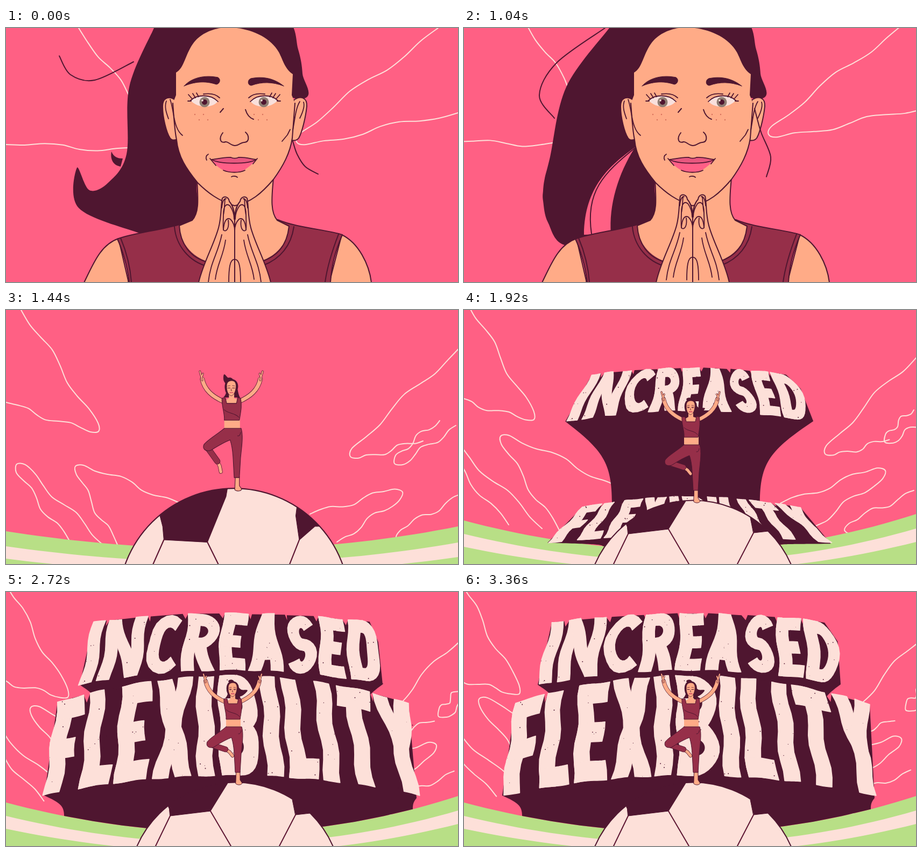
Write an HTML page with a canvas that moves like this. It is 840 by 473 pixels and loops after 3440 ms.

```html
<!DOCTYPE html>
<html lang="en">
<head>
<meta charset="utf-8">
<title>Increased flexibility</title>
<style>
html, body { margin: 0; width: 100%; height: 100%; overflow: hidden; background: #ff6084; }
canvas { display: block; width: 840px; height: 473px; }
</style>
</head>
<body>
<canvas id="stage" width="840" height="473" role="img" aria-label="Increased flexibility"></canvas>
<script>
const ctx = document.getElementById('stage').getContext('2d');
const LOOP = 3440, STEP = 80;
const PINK = '#ff6084', DARK = '#4f1630', SKIN = '#ffab87', WINE = '#962f49', CREAM = '#fde0d9', GREEN = '#b8df86';

const mix = (a, b, u) => a + (b - a) * u;
const mixAll = (a, b, u) => a.map((v, i) => mix(v, b[i], u));
const clamp = u => Math.max(0, Math.min(1, u));
const span = (t, from, to) => clamp((t - from) / (to - from));
const easeOut = u => 1 - (1 - u) ** 3;

function paint(d, fill, line, width = 2) {
  const p = typeof d === 'string' ? new Path2D(d) : d;
  if (fill) { ctx.fillStyle = fill; ctx.fill(p); }
  if (line) { ctx.strokeStyle = line; ctx.lineWidth = width; ctx.stroke(p); }
}

function poly(points) {
  const path = new Path2D();
  for (const p of points) path.lineTo(...p);
  path.closePath();
  return path;
}

// smooth curve through flat x, y points
function curve(p) {
  const path = new Path2D(), n = p.length / 2;
  const q = i => { i = Math.max(0, Math.min(n - 1, i)); return [p[2 * i], p[2 * i + 1]]; };
  path.moveTo(p[0], p[1]);
  for (let i = 0; i < n - 1; i++) {
    const [a, b, c, d] = [q(i - 1), q(i), q(i + 1), q(i + 2)];
    path.bezierCurveTo(b[0] + (c[0] - a[0]) / 6, b[1] + (c[1] - a[1]) / 6,
      c[0] - (d[0] - b[0]) / 6, c[1] - (d[1] - b[1]) / 6, c[0], c[1]);
  }
  return path;
}

function dot(x, y, r, color) {
  ctx.fillStyle = color;
  ctx.beginPath();
  ctx.arc(x, y, r, 0, 7);
  ctx.fill();
}

function mirrored(axis, draw) {
  draw();
  ctx.save();
  ctx.translate(2 * axis, 0);
  ctx.scale(-1, 1);
  draw();
  ctx.restore();
}

// ---------- drifting cloud lobes ----------
// wide and close: start, tip, end; push and nudge: how the tip travels
const lobes = [
  { wide: [28, 0, 172, 226, 0, 172], push: [-42, -22], close: [135, 0, 292, 222, 0, 217], nudge: [-36, -10] },
  { wide: [845, 68, 640, 273, 775, 244], push: [31, -5], close: [803, 0, 540, 212, 840, 158], nudge: [26, -14] },
  { wide: [180, 437, 20, 287, 118, 430], push: [-70, -60] },
  { wide: [207, 437, 129, 291, 320, 358], push: [-61, -56] },
  { wide: [836, 215, 722, 286, 806, 206], push: [60, -40] },
  { wide: [565, 380, 737, 339, 615, 432], push: [46, -40] },
  { wide: [800, 452, 725, 424, 845, 343], push: [-18, -14] }
];
const travel = (p, [dx, dy], k) => p.map((v, i) => v + (i % 2 ? dy : dx) * k * (i === 2 || i === 3 ? 1 : .5));

function lobeCurve([x0, y0, tx, ty, x1, y1], phase) {
  const mx = tx - (x0 + x1) / 2, my = ty - (y0 + y1) / 2, len = Math.hypot(mx, my);
  const dx = mx / len, dy = my / len, r = 11;
  const sign = Math.sign((y0 - ty) * dx - (x0 - tx) * dy);
  const side = (x, y, s, ph) => {
    const pts = [];
    for (let i = 0; i <= 8; i++) {
      const u = i / 8, wave = 7 * Math.sin(Math.PI * u) * Math.sin(u * 10 + ph);
      pts.push([mix(x, tx - dx * r - dy * r * s, u) - dy * wave, mix(y, ty - dy * r + dx * r * s, u) + dx * wave]);
    }
    return pts;
  };
  return curve([...side(x0, y0, sign, phase), [tx, ty], ...side(x1, y1, -sign, phase + 2).reverse()].flat());
}

function drawLobes(t, zoom) {
  const far = easeOut(span(t, 1440, 1920)) + .65 * span(t, 1920, 3360);
  lobes.forEach((l, i) => {
    let p = travel(l.wide, l.push, far);
    if (l.close) p = mixAll(travel(l.close, l.nudge, span(t, 0, 1040)), p, span(t, 1040, 1440));
    else if (t < 1280) return;
    else p = p.map((v, j) => j % 2 ? 147 + (v - 147) * zoom : 423 + (v - 423) * zoom);
    paint(lobeCurve(p, i * 1.7 + t / 1400), null, CREAM, 2);
  });
}

// ---------- portrait ----------
function drawEye() {
  paint('M343 135C354 124 380 122 394 136C385 149 358 151 343 135Z', '#f9e0dc');
  dot(369, 138, 9.5, '#8f7d72');
  paint('M343 135C354 124 380 122 394 137M367 123C380 121 391 124 397 130', null, DARK, 1.8);
  paint('M339 124L346 132M347 122L352 130M354 121L358 128M338 136L344 136', null, DARK, 1.8);
}

function drawHand() {
  paint('M357 478C365 440 386 405 395 372C401 350 399 330 402 317C406 312 414 315 415 323C423 332 425 344 425 360V478Z', SKIN, DARK);
  paint('M407 318C406 330 406 340 404 348C404 356 403 366 404 376M401 335C402 322 405 318 409 318M404 348C404 330 410 326 416 331C421 338 424 346 424 356', null, DARK, 1.8);
  paint('M404 376C405 360 410 352 417 356C423 362 425 368 425 378M405 377C411 380 415 370 413 358', null, DARK, 1.8);
  paint('M401 385C394 420 380 435 376 473M408 395C404 425 392 440 389 468M414 473C414 448 416 430 425 431', null, DARK, 1.8);
}

function drawHair(u) {
  const edge = mixAll(
    [275, 0, 229, 110, 224, 235, 190, 288, 155, 302, 132, 260, 135, 335, 245, 381],
    [270, 0, 190, 110, 160, 240, 150, 280, 147, 303, 147, 322, 156, 362, 190, 405], u);
  paint(curve([...edge, 300, 395, 358, 350, 355, 285, 380, 100, 549, 132, 551, 85, 543, 40, 520, -20, 410, -75, 300, -35, 275, 0]), DARK);
  paint(curve(mixAll([99, 52, 120, 87, 165, 97, 237, 63], [168, 168, 140, 125, 172, 65, 262, 0], u)), null, DARK);
  if (u < .6) paint('M196 230C200 240 207 243 217 243L213 258C200 256 193 245 196 230Z', DARK);
  const gap = span(u, .4, 1);
  if (!gap) return;
  ctx.save();
  ctx.translate(318, 0);
  ctx.scale(mix(.7, 1, gap), 1);
  paint('M0 222C-46 255 -94 295 -95 385L-45 383C-49 330 -32 272 0 222Z', PINK);
  paint('M-1 224C-58 270 -93 305 -81 383', null, DARK);
  ctx.restore();
}

function drawPortrait(t) {
  const u = span(t, 0, 1040);
  drawHair(u);

  // arms, neck, top
  paint('M209 392C175 404 162 440 145 474L90 800H260L227 470Z', SKIN, DARK);
  paint('M624 385C655 400 675 440 679 474L720 800H580L602 470Z', SKIN, DARK);
  paint('M207 393C230 383 290 376 322 366L345 358L505 357C540 372 600 376 625 385C610 420 605 445 603 473L620 850H210L229 473C225 440 215 410 207 393Z', WINE, DARK);
  paint('M355 280C357 320 359 344 346 358L322 368C324 400 345 432 395 440H455C500 430 522 405 526 369L504 358C492 344 493 320 497 275Z', SKIN);
  paint('M355 283C357 320 359 344 346 358L322 368C324 400 340 428 378 437M472 436C505 425 522 405 526 369L504 358C492 344 493 320 497 280', null, DARK);
  paint('M313 370C316 405 340 435 375 444M535 370C530 405 510 430 478 442M213 391C223 415 231 445 233 473M618 384C606 415 597 445 593 473', null, DARK);

  // ears and face
  paint('M314 134C304 126 291 129 291 146C291 166 298 195 305 205C309 210 314 209 318 207Z', SKIN, DARK);
  paint('M535 134C548 125 560 130 559 146C557 166 550 195 544 205C540 210 535 210 531 209Z', SKIN, DARK);
  paint('M316 83C331 75 333 50 347 30C362 8 390 -1 412 -1C450 -1 490 15 507 45C515 60 518 76 533 86L531 125L537 140L532 205C528 233 515 257 497 282C475 308 455 325 425 331C400 328 375 305 356 288C335 262 320 240 317 208L309 143L316 125Z', SKIN);
  paint('M310 140C312 165 313 190 317 208C320 240 335 262 356 288C375 307 395 322 425 331C455 325 475 308 497 282C515 257 528 233 532 205L537 140', null, DARK);
  paint('M298 136C294 147 298 158 302 169M305 133C311 150 311 170 317 184C320 192 324 197 328 200M553 138C556 147 550 160 546 168M546 137C538 150 537 170 533 190M513 211L523 199L528 189', null, DARK, 1.8);
  paint(curve(mixAll([533, 211, 541, 235, 556, 258, 580, 272], [540, 150, 552, 194, 570, 240, 562, 277], u)), null, DARK);

  // features
  mirrored(424, drawEye);
  for (const x of [369, 479]) {
    dot(x, 138, 5, DARK);
    dot(x - 4, 135, 1.8, CREAM);
    for (let i = 0; i < 4; i++) dot(x - 18 + i * 8, 163 + (i % 2 ? 8 : -2), 1.2, '#d8705c');
  }
  paint('M331 108C345 92 370 87 394 92C400 96 397 104 391 105C370 98 350 100 331 108Z', DARK, DARK, 1);
  paint('M516 108C500 95 480 89 455 94C448 97 449 107 456 107C475 100 495 100 516 108Z', DARK, DARK, 1);
  paint('M404 150L398 157M445 152C448 162 454 168 460 170', null, DARK);
  paint('M403 195C395 205 398 216 408 212C413 211 416 218 425 219C433 219 437 212 443 213C453 212 452 200 445 194', null, DARK);
  paint('M382 245C395 243 410 240 418 241C422 243 428 243 432 241C445 240 455 244 465 245C450 262 438 269 424 269C408 269 393 262 382 245Z', '#ff5f87');
  paint('M382 245C395 243 410 240 418 241C422 243 428 243 432 241C445 240 455 244 465 245C450 254 398 254 382 245Z', '#e8577f', DARK, 1.8);
  paint('M379 243L390 256M467 243L459 253M404 265C415 270 434 270 444 265M376 235C371 238 371 242 373 246M419 277C423 275 428 276 430 278', null, DARK, 1.8);

  ctx.translate(0, -4 * u);
  mirrored(425, drawHand);
}

// ---------- pitch ----------
const bow = (c, l, r = l) => x => { const u = (x - 420) / 420; return c - (u < 0 ? l : r) * u * u; };
const turfEdge = g => bow(mix(445, 448, g), mix(33, 56, g), mix(42, 68, g));

function drawPitch(g) {
  const band = (f, color) => {
    const p = [[840, 900], [0, 900]];
    for (let x = 0; x <= 840; x += 20) p.push([x, f(x)]);
    paint(poly(p), color);
  };
  band(turfEdge(g), GREEN);
  band(bow(mix(470, 468, g), mix(30, 51, g), mix(37, 61, g)), CREAM);
  band(bow(mix(490, 485, g), mix(27, 44, g), mix(30, 53, g)), GREEN);
}

// ---------- lettering ----------
// letters are built in a unit box from stems, bars and arcs
const STEM = 23, BAR = .2;
const widths = { I: 25, N: 74, C: 63, R: 61, E: 46, A: 65, S: 53, D: 60, F: 43, L: 42, X: 56, B: 58, T: 52, Y: 58 };

function pen(width) {
  const s = Math.min(1, STEM / width);
  const block = (x0, y0, x1, y1) => [[x0, y0], [x1, y0], [x1, y1], [x0, y1]];
  const stem = (a, b = a, y0 = 0, y1 = 1) => {
    const x0 = a * (1 - s), x1 = b * (1 - s);
    return [[x0, y0], [x0 + s, y0], [x1 + s, y1], [x1, y1]];
  };
  const bar = (y, x0 = 0, x1 = 1) => block(x0, y * (1 - BAR), x1, y * (1 - BAR) + BAR);
  const arc = (cx, cy, rx, ry, from, to) => {
    const outer = [], inner = [];
    for (let i = 0; i <= 16; i++) {
      const a = mix(from, to, i / 16) * Math.PI / 180;
      outer.push([cx + rx * Math.cos(a), cy + ry * Math.sin(a)]);
      inner.unshift([cx + (rx - s * .9) * Math.cos(a), cy + (ry - BAR) * Math.sin(a)]);
    }
    return [...outer, ...inner];
  };
  const bowl = (y0, y1) => [block(0, y0, .47, y0 + BAR), block(0, y1 - BAR, .47, y1),
    arc(.45, (y0 + y1) / 2, .55, (y1 - y0) / 2, -90, 90)];
  return { stem, bar, arc, bowl };
}

const glyphs = {
  I: p => [p.stem(0)],
  N: p => [p.stem(0), p.stem(0, 1), p.stem(1)],
  C: p => [p.arc(.6, .5, .6, .5, 50, 310)],
  R: p => [p.stem(0), ...p.bowl(0, .62), p.stem(.45, 1, .5, 1)],
  E: p => [p.stem(0), p.bar(0), p.bar(.5, 0, .86), p.bar(1)],
  A: p => [p.stem(.5, 0), p.stem(.5, 1), p.bar(.76, .25, .75)],
  S: p => [p.arc(.5, .3, .5, .3, -30, -270), p.arc(.5, .7, .5, .3, -90, 150)],
  D: p => [p.stem(0), ...p.bowl(0, 1)],
  F: p => [p.stem(0), p.bar(0), p.bar(.54, 0, .86)],
  L: p => [p.stem(0), p.bar(1)],
  X: p => [p.stem(0, 1), p.stem(1, 0)],
  B: p => [p.stem(0), ...p.bowl(0, .57), ...p.bowl(.43, 1)],
  T: p => [p.stem(.5), p.bar(0)],
  Y: p => [p.stem(0, .5, 0, .52), p.stem(1, .5, 0, .52), p.stem(.5, .5, .5, 1)]
};

// pose: top scale, bottom scale, top y, height scale, base left, base right, base y
const rows = [
  { word: 'INCREASED', y0: 40, h: 134, topX: [163, 690], lowX: [137, 700], tuck: 0, top: bow(40, -44), low: bow(145, -61), from: 1520,
    hidden: [.3, .35, 400, .1, 380, 470, 420], rising: [.7, .82, 108, .75, 275, 550, 360], full: [1, 1, 40, 1, 175, 665, 230] },
  { word: 'FLEXIBILITY', y0: 155, h: 225, topX: [96, 751], lowX: [71, 790], tuck: 27, top: bow(156, -84), low: bow(341, -55), from: 1760,
    hidden: [.4, .5, 440, .05, 360, 480, 450], rising: [.57, .76, 347, .386, 258, 590, 441], full: [1, 1, 155, 1, 108, 756, 420] }
];

function layout(row) {
  const gap = 8, total = [...row.word].reduce((sum, c) => sum + widths[c] + gap, -gap);
  let x = 0;
  row.letters = [...row.word].map(c => {
    const w = widths[c], letter = { a: x / total, b: (x + w) / total, parts: glyphs[c](pen(w)) };
    x += w + gap;
    return letter;
  });
}
rows.forEach(layout);

function random(seed) {
  return () => (seed = (seed * 16807) % 2147483647) / 2147483647;
}

function drawRow(row, t, floor) {
  if (t <= row.from) return;
  const pose = t < 1920 ? mixAll(row.hidden, row.rising, span(t, row.from, 1920))
    : mixAll(row.rising, row.full, easeOut(span(t, 1920, 2160)));
  const [topScale, lowScale, y1, tall, xl, xr, base] = pose;

  const place = (x, y) => {
    const v = (y - row.y0) / row.h;
    return [420 + (x - 420) * mix(topScale, lowScale, v), y1 + (y - row.y0) * tall];
  };
  const flat = (f, v) => {
    const a = mix(...row.topX, f), b = mix(...row.lowX, f);
    return [mix(a, b, v), mix(row.top(a), row.low(b), v)];
  };
  const sway = (letter, u, v) => {
    const [x, y] = flat(mix(letter.a, letter.b, u), v);
    return place(x + 3 * Math.sin(y / 16 - t / 210 + letter.a * 12), y + 1.2 * Math.sin(x / 13 + t / 260));
  };

  // solid depth behind the letters
  const a = place(...flat(0, 1)), end = flat(1, 1), b = place(end[0] - row.tuck, end[1]);
  const under = x => floor ? floor(x) : base;
  const block = new Path2D();
  block.moveTo(...a);
  row.letters.forEach((l, i) => {
    const last = i === row.letters.length - 1;
    block.lineTo(...sway(l, 0, 0));
    block.lineTo(...sway(l, last && !row.tuck ? .7 : 1, 0));
    if (!last) block.lineTo(...sway(l, 1.1, .09));
    else if (!row.tuck) block.lineTo(...sway(l, 1, .3));
  });
  block.lineTo(...b);
  const wall = (from, x, back) => {
    const y = v => mix(from[1], under(x), v), c = [[mix(from[0], x, .8), y(.35)], [x, y(.5)]];
    if (back) block.bezierCurveTo(...c[1], ...c[0], ...from);
    else block.bezierCurveTo(...c[0], ...c[1], x, under(x));
  };
  wall(b, xr, false);
  for (let i = 1; i <= 12; i++) {
    const x = mix(xr, xl, i / 12);
    block.lineTo(x, under(x));
  }
  wall(a, xl, true);
  paint(block, DARK);

  const rnd = random(row.h);
  for (const l of row.letters) {
    for (const part of l.parts) {
      const pts = [];
      part.forEach(([x, y], j) => {
        const [nx, ny] = part[(j + 1) % part.length];
        const n = Math.ceil(Math.hypot(nx - x, ny - y) * 10);
        for (let k = 0; k < n; k++) pts.push(sway(l, mix(x, nx, k / n), mix(y, ny, k / n)));
      });
      paint(poly(pts), CREAM, CREAM, 1.5);
    }
    for (let k = 0; k < 7; k++) dot(...sway(l, rnd(), rnd()), .4 + rnd() * .6, DARK);
  }
}

// ---------- ball ----------
const BALL = { x: 425.5, y: 553.5, r: 199 };

// point on the ball, rolled back by an angle
function roll(x, y, angle) {
  const dx = x - BALL.x, dy = y - BALL.y;
  const z = Math.sqrt(Math.max(0, BALL.r ** 2 - dx * dx - dy * dy));
  return [x, BALL.y + dy * Math.cos(angle) + z * Math.sin(angle)];
}

function drawBall(g) {
  const at = (x, y) => roll(x, y, .27 * (1 - g));
  const seam = '#5e1733', ball = new Path2D();
  ball.arc(BALL.x, BALL.y, BALL.r, 0, 7);
  paint(ball, CREAM);
  ctx.save();
  ctx.clip(ball);
  const left = at(305, 417), inner = at(380, 408), right = at(538, 415);
  paint(poly([at(303, 403), [290, 370], [340, 320], [416, 345], at(412, 356), inner, left]), DARK, DARK, 1);
  paint(poly([at(532, 388), [536, 370], [590, 380], [590, 420], at(565, 412), right]), DARK, DARK, 1);
  for (const [a, b] of [[left, at(278, 473)], [inner, at(418, 473)], [right, at(508, 473)]]) paint(poly([a, b]), null, seam);
  ctx.restore();
  paint(ball, null, DARK);
}

// ---------- dancer ----------
function limb(d, color, width) {
  paint(d, null, DARK, width + 1.4);
  paint(d, null, color, width);
}

function drawDancer(t, g) {
  // hair
  const wind = Math.sin(t / 200);
  const tail = mixAll([412, 176, 407, 168, 408, 158, 416, 165, 428, 172], [430, 176, 437, 182, 448, 183, 440, 192, 430, 196], g);
  paint(curve(tail.map((v, i) => i % 2 ? v : v + wind)), DARK);
  paint('M412 190C406 175 413 165 421 166C430 166 435 175 432 184C433 190 434 194 436 198L407 198C410 195 411 193 412 190Z', DARK);
  paint('M420 168C414 170 411 166 415 164C420 162 424 165 424 168Z', DARK);

  // arms
  mirrored(421, () => {
    limb('M371 166C375 185 388 196 408 205', SKIN, 6.5);
    limb('M371 168L369 160L367 153M370 163L372 157', SKIN, 2);
  });
  // trunk
  paint('M417 190H426V199L436 202V253H409V204L417 199Z', SKIN);
  paint('M405 199L411 199L413 208H430L432 198L437 199C440 212 437 224 435 237H409C410 225 404 212 405 199Z', WINE, DARK, 1);
  paint('M409 219C415 226 428 224 434 232', null, DARK, 1);
  // bent leg
  const [ax, ay, tx, ty] = mixAll([397, 308, 403, 326], [408, 293, 421, 305], g);
  limb(`M${ax} ${ay}L${(ax + tx) / 2 + 1} ${(ay + ty) / 2 - 1}L${tx} ${ty}`, SKIN, 5);
  limb(`M380 284L${ax} ${ay}`, WINE, 9);
  // standing leg
  paint('M428 334H435L435 350L439 356C437 360 430 360 427 357Z', SKIN, DARK, 1);
  paint('M409 251H438C442 264 439 282 437 302L435 336H426L424 300C423 285 421 277 419 271C404 277 394 284 386 289C376 292 371 286 374 279C380 271 396 262 409 251Z', WINE, DARK, 1);
  paint('M432 264C435 265 437 261 437 258', null, DARK, 1);

  // face
  paint('M413 179C413 171 417 169 422 169C427 169 430 173 429 181C428 189 425 194 421 195C417 194 413 189 413 179Z', SKIN, DARK, .7);
  const shut = t > 3200 || t < 1700;
  paint(shut ? 'M415 181.500H419M423 181.500H427' : 'M415 181H419M416 182H418M423 181H427M424 182H426', null, DARK, 1);
  paint('M415 178L419 177.500M423 177.500L427 178M421 183L420.500 186H422', null, DARK, .7);
  paint('M418.500 189.500H424', null, '#c83a5c', 1.3);
}

// ---------- scene ----------
function draw(t) {
  ctx.setTransform(1, 0, 0, 1, 0, 0);
  ctx.lineCap = ctx.lineJoin = 'round';
  ctx.fillStyle = PINK;
  ctx.fillRect(0, 0, 840, 473);

  const far = .068, out = span(t, 1120, 1440), shrink = far ** out, zoom = shrink / far;
  drawLobes(t, zoom);

  if (t < 1280) {
    ctx.translate(mix(424, 423, out), mix(170, 147, out));
    ctx.scale(shrink, shrink);
    ctx.translate(-424, -170);
    drawPortrait(t);
    return;
  }

  const g = easeOut(span(t, 1440, 1840));
  ctx.translate(423, 147);
  ctx.scale(zoom, zoom);
  ctx.translate(-423, -147);
  drawPitch(g);
  drawRow(rows[0], t);
  drawRow(rows[1], t, turfEdge(g));

  const k = mix(1.08, 1, g);
  ctx.translate(mix(423.5, BALL.x, g), mix(547, BALL.y, g));
  ctx.scale(k, k);
  ctx.translate(-BALL.x, -BALL.y);
  drawBall(g);
  drawDancer(t, g);
}

const start = performance.now();
function tick() {
  const t = (performance.now() - start) % LOOP;
  draw(Math.floor(t / STEP) * STEP);
  requestAnimationFrame(tick);
}
tick();
</script>
</body>
</html>
```
